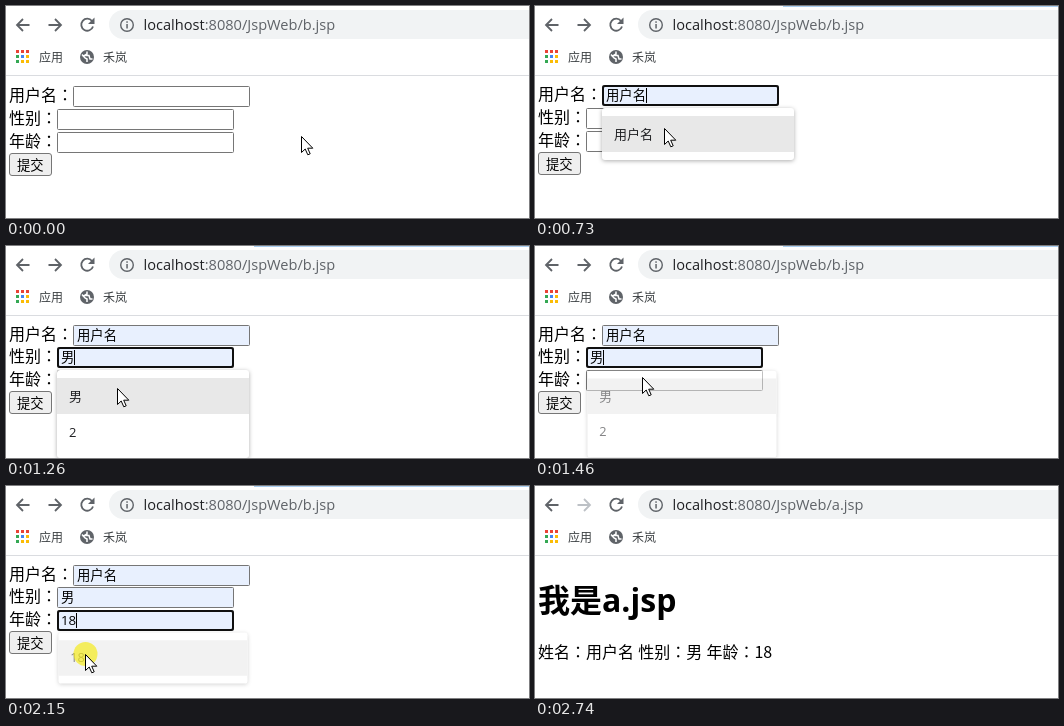
Animation of 523 by 212 pixels, one loop 2840 ms. Source, as an HTML page:

```html
<!DOCTYPE html>
<html lang="zh-CN">
<head>
<meta charset="utf-8">
<style>
  html, body { margin: 0; width: 100%; height: 100%; overflow: hidden; background: #fff; }
  svg { display: block; width: 523px; height: 212px; }
  text { font-family: "Open Sans", "Noto Sans CJK SC", "Noto Sans CJK", sans-serif; white-space: pre; }
  .colon { font-family: "Noto Sans CJK JP", "Noto Sans CJK SC", sans-serif; }
  .body { font-family: "Noto Sans CJK SC", "Noto Sans CJK", sans-serif; word-spacing: .6px; }
  .icon { fill: none; stroke: #5f6368; stroke-width: 1.8; }
  .popup { filter: drop-shadow(0 1px 2px rgba(0, 0, 0, .32)); }
</style>
</head>
<body>
<svg id="stage" viewBox="0 0 523 212" lang="zh-CN"></svg>
<script>
const LOOP = 2840;
const NS = 'http://www.w3.org/2000/svg';
const stage = document.getElementById('stage');

function add(parent, tag, attrs = {}) {
  const el = document.createElementNS(NS, tag);
  for (const k in attrs) el.setAttribute(k, attrs[k]);
  parent.appendChild(el);
  return el;
}

const rect = (p, x, y, width, height, fill, more) =>
  add(p, 'rect', { x, y, width, height, fill, ...more });

// Full-width colons use Japanese forms, which sit centred.
function text(p, x, y, size, str, more) {
  const el = add(p, 'text', { x, y, 'font-size': size, fill: '#000', ...more });
  for (const part of str.split(/(：)/)) {
    if (part) add(el, 'tspan', part === '：' ? { class: 'colon', lang: 'ja' } : {}).textContent = part;
  }
  return el;
}

const show = (el, on) => el.setAttribute('visibility', on ? 'visible' : 'hidden');
const place = (el, x, y) => el.setAttribute('transform', `translate(${x} ${y})`);
const within = (t, [a, b]) => t >= a && t < b;

// Browser bars
const strip = rect(stage, 248, 0, 275, 1, '#a8cdf0');
rect(stage, 103, 4, 440, 29, '#f1f3f4', { rx: 14.5 });
rect(stage, 0, 69, 523, 1, '#dadce0');
const icon = d => add(stage, 'path', { d, class: 'icon' });
icon('M23.5 19H11.5M17 13L11 19L17 25');
const forward = icon('M42.5 19H54.5M49 13L55 19L49 25');
icon('M86 15A6 6 0 1 0 87 20.5');
add(stage, 'path', { d: 'M88.5 11.5V18H82Z', fill: '#5f6368' });
add(stage, 'circle', { cx: 121, cy: 19, r: 6.3, fill: 'none', stroke: '#5f6368', 'stroke-width': 1.4 });
rect(stage, 120.3, 15.3, 1.5, 1.5, '#5f6368');
rect(stage, 120.3, 18, 1.5, 4.5, '#5f6368');

const url = text(stage, 137.5, 24, 14.6, '', { fill: '#5f6368' });
add(url, 'tspan', { fill: '#202124' }).textContent = 'localhost';
const path = add(url, 'tspan');

const dots = ['#ea4335', '#ea4335', '#ea4335', '#34a853', '#4285f4', '#fbbc05', '#34a853', '#fbbc05', '#fbbc05'];
dots.forEach((c, i) => rect(stage, 10 + i % 3 * 5, 44 + Math.floor(i / 3) * 5, 3, 3, c));
text(stage, 33, 55.5, 12, '应用', { fill: '#3c4043' });
add(stage, 'circle', { cx: 81, cy: 51, r: 7, fill: '#5f6368' });
add(stage, 'path', {
  d: 'M76 48.5L79 52L81 53V56M81 45.5V48L78.5 49.5H83L84 53H86.5',
  fill: 'none', stroke: '#fff', 'stroke-width': 1.5
});
text(stage, 97, 55.5, 12, '禾岚', { fill: '#3c4043' });

// Form page
const form = add(stage, 'g');
const fields = [
  { label: '用户名：', x: 67, tops: [80, 79, 79, 79], value: '用户名', list: ['用户名'], menuY: 102,
    focus: [310, 1030], hover: 730, open: 400, fade: 880, close: 950 },
  { label: '性别：', x: 51, tops: [103, 102, 101, 101], value: '男', list: ['男', '2'], menuY: 124,
    focus: [1030, 1680], hover: 1260, open: 1030, fade: 1460, close: 1530 },
  { label: '年龄：', x: 51, tops: [126, 125, 124, 124], value: '18', list: ['18'], menuY: 146,
    focus: [1680, 2430], hover: 2000, open: 1680, fade: 2080, close: 2160 }
];

for (const f of fields) {
  f.row = add(form, 'g');
  text(f.row, 3, 15, 16, f.label);
  f.box = rect(f.row, f.x + .5, .5, 176, 20, '#fff', { stroke: '#767676', rx: 1 });
  f.ring = rect(f.row, f.x + 1, 1, 175, 19, 'none', { stroke: '#101010', 'stroke-width': 2, rx: 2 });
  f.text = text(f.row, f.x + 4, 15.3, 13.333, f.value);
  f.caret = rect(f.row, 0, 3, 1, 15, '#000');
  f.caretEnd = f.x + 4 + 13.333 * (f.value === '18' ? 1.15 : f.value.length);
}

const button = add(form, 'g');
rect(button, 3.5, .5, 42, 22, '#efefef', { stroke: '#767676', rx: 2.5 });
text(button, 11, 16.5, 13.333, '提交');

for (const f of fields) {
  f.menu = add(form, 'g', { class: 'popup' });
  f.menuH = 16 + 36 * f.list.length;
  rect(f.menu, 0, 0, 192, f.menuH, '#fff', { rx: 3 });
  f.mark = rect(f.menu, 0, 8, 192, 36, '#e8e8e8');
  f.list.forEach((s, i) => text(f.menu, 12, 30.5 + 36 * i, 13, s, { fill: '#202124' }));
}

// A closing popup turns translucent and shrinks about its centre.
function drawMenu(f, t) {
  const fading = t >= f.fade, k = fading ? .985 : 1;
  show(f.menu, within(t, [f.open, f.close]));
  show(f.mark, within(t, [f.hover, f.close]));
  f.menu.setAttribute('opacity', fading ? .55 : 1);
  const x = f.x + 96 * (1 - k), y = f.menuY + f.menuH / 2 * (1 - k);
  f.menu.setAttribute('transform', `translate(${x} ${y}) scale(${k})`);
}

// Result page
const result = add(stage, 'g');
text(result, 3, 125.5, 32, '我是a.jsp', { 'font-weight': 700 });
text(result, 3, 172, 16, '姓名：用户名 性别：男 年龄：18', { class: 'body' });

// Pointer
const pointer = add(stage, 'g');
const glow = add(pointer, 'circle', { cx: -.5, cy: 0, r: 12, fill: '#f5e90c', opacity: .65 });
const arrow = add(pointer, 'path', {
  d: 'M-.5 .5V16.5L3.2 13L5.8 18.8L8.2 17.8L5.7 12.2H10.8Z', fill: '#fff', stroke: '#000'
});
const beam = add(pointer, 'path', {
  d: 'M-3.5 -7.5H-1L.5 -6.5L2 -7.5H4.5M.5 -6.5V6.5M-3.5 7.5H-1L.5 6.5L2 7.5H4.5',
  fill: 'none', stroke: '#111'
});

// time, x, y, shape (a = arrow, i = beam, c = click glow)
const steps = [
  [0, 296, 130, 'a'], [70, 285, 127, 'a'], [150, 255, 116, 'a'], [230, 212, 102, 'i'],
  [310, 182, 94, 'ic'], [400, 174, 94, 'i'], [480, 169, 98, 'i'], [560, 158, 106, 'a'],
  [660, 144, 114, 'a'], [730, 130, 122, 'a'], [800, 122, 126, 'ac'], [880, 120, 124, 'a'],
  [950, 120, 115, 'i'], [1030, 120, 109, 'ic'], [1130, 119, 116, 'i'], [1180, 116, 128, 'a'],
  [1260, 112, 142, 'a'], [1360, 109, 146, 'ac'], [1460, 108, 131, 'a'], [1530, 104, 132, 'i'],
  [1600, 101, 134, 'i'], [1680, 99, 135, 'ic'], [1760, 98, 138, 'i'],
  [1830, 96, 142, 'i'], [1930, 92, 148, 'a'], [2000, 87, 163, 'a'], [2080, 80, 168, 'ac'],
  [2160, 64, 164, 'a'], [2240, 44, 156, 'a'], [2330, 33, 150, 'a'],
  [2430, 31, 149, 'ac'], [2500, 31, 149, 'a'], [2580, 32, 154, 'a'], [2660, 33, 163, 'a'],
  [2740, 33, 163, '']
];

function draw(time) {
  const [t, x, y, shape] = steps.findLast(s => s[0] <= time);
  const filled = fields.filter(f => t >= f.hover).length;
  const done = t >= 2580;

  form.style.display = done ? 'none' : '';
  result.style.display = done ? '' : 'none';
  path.textContent = `:8080/JspWeb/${done ? 'a' : 'b'}.jsp`;
  forward.style.stroke = done ? '#bdc1c6' : '#5f6368';
  show(strip, within(t, [400, 2580]));

  for (const f of fields) {
    const full = t >= f.hover, focused = within(t, f.focus);
    place(f.row, 0, f.tops[filled]);
    f.box.setAttribute('fill', full ? '#e8f0fe' : '#fff');
    show(f.text, full);
    show(f.ring, focused);
    show(f.caret, focused);
    f.caret.setAttribute('x', Math.round(full ? f.caretEnd : f.x + 4));
    drawMenu(f, t);
  }
  place(button, 0, [147, 146, 145, 145][filled]);

  place(pointer, x, y);
  show(arrow, shape.includes('a'));
  show(beam, shape.includes('i'));
  show(glow, shape.includes('c'));
}

function tick() {
  draw(performance.now() % LOOP);
  requestAnimationFrame(tick);
}
tick();
</script>
</body>
</html>
```
